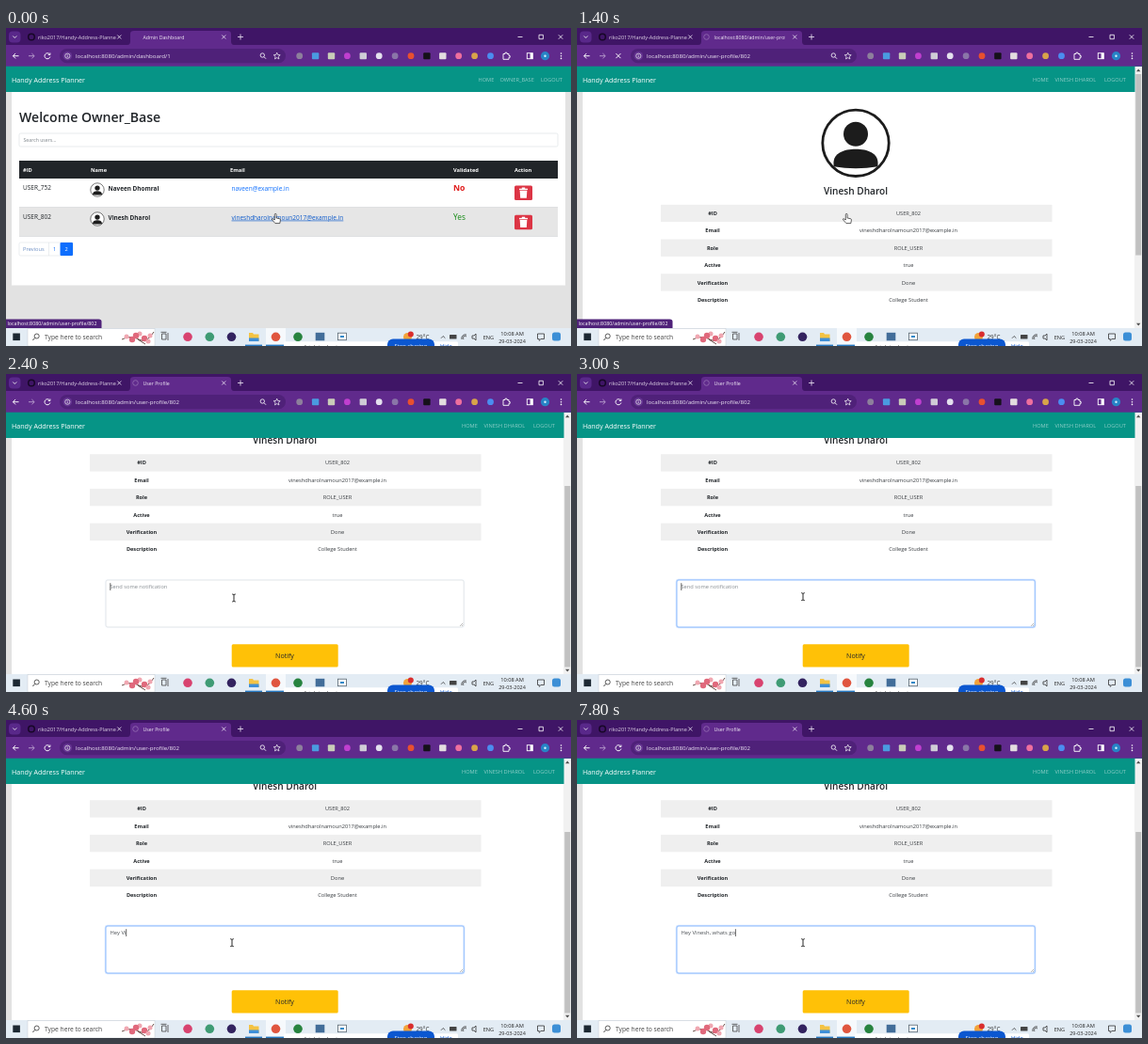
Write an HTML page that moves like this. It is 600 px wide and 338 px high and loops after 8 s.

```html
<!DOCTYPE html>
<html lang="en">
<head>
<meta charset="utf-8">
<title>Admin Dashboard</title>
<style>
html, body { margin: 0; width: 100%; height: 100%; overflow: hidden; background: #e2e2e2; }
svg { display: block; width: 100vw; height: 100vh; font-family: "Open Sans", "Noto Sans", sans-serif; }
text { white-space: pre; }
</style>
</head>
<body>
<svg id="stage" viewBox="0 0 600 338"></svg>
<script>
const STEP = 200, LOOP = 8000, SCROLL_MAX = 102.6;
const INK = '#212529', STRIP = '#3f1566', TOOLBAR = '#602a8c', OMNIBOX = '#4f2179';

const text = (x, y, size, str, fill = INK, extra = '') =>
  `<text x="${x}" y="${y}" font-size="${size}" fill="${fill}" ${extra}>${str}</text>`;
const rect = (x, y, w, h, fill, extra = '') =>
  `<rect x="${x}" y="${y}" width="${w}" height="${h}" fill="${fill}" ${extra}/>`;
const dot = (x, y, r, fill, extra = '') =>
  `<circle cx="${x}" cy="${y}" r="${r}" fill="${fill}" ${extra}/>`;
const line = (d, stroke, w = 1, extra = '') =>
  `<path d="${d}" fill="none" stroke="${stroke}" stroke-width="${w}" ${extra}/>`;
const group = (id, body) => `<g id="${id}">${body}</g>`;
const BOLD = 'font-weight="700"', SEMI = 'font-weight="600"', MID = 'text-anchor="middle"';

const person = (x, y, s) => `<g transform="translate(${x} ${y}) scale(${s})" fill="#1c1c1c">
  ${dot(0, 0, 35.2, '#fff', 'stroke="#1c1c1c" stroke-width="2.8"')}
  <circle cy="-9.5" r="13"/>
  <path d="M-23.5 25V21C-23.5 11-13 6.5 0 6.5S23.5 11 23.5 21V25Q0 29-23.5 25Z"/></g>`;

const trash = y => rect(540, y, 19, 15.5, '#dc3545', 'rx="1.5"') +
  rect(545, y + 3.2, 9, 1.4, '#fff') + rect(547.8, y + 2, 3.4, 1.4, '#fff') +
  `<path d="M545.7 ${y + 5.2}h7.6l-.5 8h-6.6z" fill="#fff"/>`;

const userRow = (y, id, name, mail, hover) =>
  text(18, y + 12.3, 6.5, id) + person(97, y + 12, .205) +
  text(108.5, y + 13.4, 6.4, name, INK, BOLD) +
  text(239.5, y + 12.6, 6.5, mail, hover ? '#0a58ca' : '#0d6efd',
    hover ? 'text-decoration="underline"' : '');

function dashboard() {
  const heads = [[18, '#ID'], [90, 'Name'], [238, 'Email'], [475, 'Validated'], [540, 'Action']];
  return rect(0, 41, 600, 278, '#e2e2e2') + rect(6, 60, 588, 213.5, '#fff') +
    text(14, 99.8, 14.1, 'Welcome Owner_Base', INK, SEMI) +
    rect(14, 112, 572, 14, '#fff', 'stroke="#dee2e6" stroke-width=".7" rx="1.5"') +
    text(18.5, 121, 5.2, 'Search users...', '#7c8389') +
    rect(14, 141, 572, 19, INK) +
    heads.map(([x, s]) => text(x, 152.8, 5.7, s, '#fff', BOLD)).join('') +
    rect(14, 190.5, 572, 31, '#e6e6e6') +
    line('M14 190.5H586M14 221.5H586', '#d3d6d9', .6) +
    userRow(160, 'USER_752', 'Naveen Dhomral', 'naveen@example.in') +
    userRow(191, 'USER_802', 'Vinesh Dharol', 'vineshdharolnamoun2017@example.in', true) +
    text(475, 173.3, 8.7, 'No', '#e01b1b', BOLD) +
    text(475, 204.3, 8.3, 'Yes', '#138a13') +
    trash(167.5) + trash(198.7) +
    rect(14, 228, 57, 14, '#fff', 'stroke="#dee2e6" stroke-width=".6" rx="1.5"') +
    line('M45.5 228V242', '#dee2e6', .6) + rect(57.5, 228, 13.5, 14, '#0d6efd', 'rx="1"') +
    text(18, 237.3, 5.7, 'Previous', '#6d8fc4') + text(50, 237.3, 5.7, '1', '#0d6efd') +
    text(62.5, 237.3, 5.7, '2', '#fff');
}

function profile() {
  const rows = [['#ID', 'USER_802'], ['Email', 'vineshdharolnamoun2017@example.in'],
    ['Role', 'ROLE_USER'], ['Active', 'true'], ['Verification', 'Done'],
    ['Description', 'College Student']];
  const table = rows.map(([key, value], i) => {
    const y = 187.8 + i * 18.35;
    return (i % 2 ? '' : rect(89, y, 415.5, 18.35, '#efefef')) +
      text(144, y + 11.3, 5.6, key, INK, `${BOLD} ${MID}`) +
      text(352, y + 11.3, 5.7, value, '#3a3e42', MID);
  }).join('');
  const page = person(296, 122.3, 1) + text(296, 176.5, 10.1, 'Vinesh Dharol', INK, `${SEMI} ${MID}`) + table +
    rect(104.8, 320.4, 382.6, 52.4, '#cfe2ff', 'id="glow" rx="3"') +
    rect(106, 321.6, 380.2, 50, '#fff', 'id="area" rx="2" stroke-width=".9"') +
    line('M482 370.6l3.2-3.2M484 370.6l1.4-1.4', '#777', .5) +
    text(110.5, 331, 5.85, '', '#555b60', 'id="typed"') +
    line('M0 324.8V332.6', '#222', .7, 'id="caret"') +
    rect(239.7, 389.8, 113, 24.4, '#ffc107', 'rx="1.5"') +
    text(296, 404.9, 7.1, 'Notify', INK, MID);
  return rect(0, 41, 600, 278, '#e2e2e2') + rect(6, 41, 586.5, 278, '#fff') + group('page', page);
}

const scrollbar = () => rect(592.5, 41, 7.5, 278, '#f1f1f1') +
  rect(593.2, 49, 6, 192.5, '#c1c1c1', 'id="thumb"') +
  '<path d="M594 46.3l2.2-2.8 2.2 2.8zM594 313.7l2.2 2.8 2.2-2.8z" fill="#505050"/>';

function navbar() {
  const links = items => items.map(([x, s]) => text(x, 57, 5.65, s, '#fff', 'fill-opacity=".55"')).join('');
  return rect(0, 40, 600, 28, '#069486') + text(6, 57.5, 7.15, 'Handy Address Planner', '#fff') +
    group('navMain', links([[501.5, 'HOME'], [524.5, 'OWNER_BASE'], [568, 'LOGOUT']])) +
    group('navUser', scrollbar() +
      links([[484, 'HOME'], [507.5, 'VINESH DHAROL'], [560, 'LOGOUT']]));
}

function browser() {
  const icons = ['#8d7f9c', '#4a9be0', '#c9ccb8', '#c03fd0', '#cfccd6', '#e4e0ee', '#8a76a8',
    '#e8502f', '#15111a', '#e3dcdf', '#ee6f9e', '#d8a44a', '#4b8df0'];
  const squares = [1, 2, 4, 8, 9];
  return rect(0, 0, 600, 19, STRIP) + rect(0, 18, 600, 22.7, TOOLBAR) +
    `<path d="M129 18Q132 18 132 14V6Q132 3 136 3H235Q239 3 239 6V14Q239 18 242 18Z" fill="${TOOLBAR}"/>` +
    rect(3, 3.5, 12.5, 12, '#59288a', 'rx="4"') + line('M7.3 8.5l2 2 2-2', '#eee', .9) +
    dot(27, 9.5, 3.3, 'none', 'stroke="#170727" stroke-width="1.5"') +
    dot(137.5, 9.5, 2.8, 'none', 'id="tabIcon" stroke="#8c62ad" stroke-width="1"') +
    '<clipPath id="tabClip"><rect x="30" y="3" width="87" height="14"/><rect x="140" y="3" width="81" height="14"/></clipPath>' +
    '<g clip-path="url(#tabClip)">' +
    text(34, 11.6, 5.5, 'riko2017/Handy-Address-Planner', '#e3d9ea') +
    text(145.5, 11.6, 5.2, '', '#f3edf7', 'id="tabTitle"') + '</g>' +
    line('M118.3 7.5l4 4m0-4l-4 4M229.3 7.5l4 4m0-4l-4 4M246 9.5h6m-3-3v6', '#f0eaf5', .8) +
    line('M543.5 9.5h5M566 7.3h4.4v4.4H566zM586.8 7.3l4.4 4.4m0-4.4l-4.4 4.4', '#fff', .8) +
    line('M13.5 29.7H7.5m2.6-2.7l-2.7 2.7 2.7 2.7', '#fff', .95) +
    line('M24 29.7h6m-2.6-2.7l2.7 2.7-2.7 2.7', '#b79bcd', .95) +
    line('M46.2 27.7a3 3 0 1 0 .7 2.8m0-4v2h-2', '#fff', .95, 'id="reload"') +
    line('M41.4 27.1l5 5m0-5l-5 5', '#fff', .95, 'id="stop"') +
    rect(57, 22, 240, 15.3, OMNIBOX, 'rx="7.6"') +
    dot(65.3, 29.7, 4.8, '#653492') +
    dot(65.3, 29.7, 2.6, 'none', 'stroke="#eee" stroke-width=".7"') + line('M65.3 29.3v1.8M65.3 28v.6', '#eee', .7) +
    text(74, 31.8, 6.15, '', '#efe8f5', 'id="url"') +
    dot(272.3, 29, 2.2, 'none', 'stroke="#fff" stroke-width=".8"') + line('M274 30.7l2 2', '#fff', .9) +
    line('M287.7 26.2l1 2.3 2.5.2-1.9 1.7.6 2.5-2.2-1.3-2.2 1.3.6-2.5-1.9-1.7 2.5-.2z', '#fff', .7) +
    icons.map((c, i) => squares.includes(i) ? rect(308 + i * 16.9, 26.2, 7.4, 7, c, 'rx="1"')
      : dot(311.7 + i * 16.9, 29.7, 3.4, c)).join('') +
    line('M528 27.5h2v-1.3h2v1.3h2v2h1.2v1.8H534v2h-6z', '#fff', .9) +
    rect(553.3, 26.7, 6, 6, 'none', 'stroke="#fff" stroke-width=".9"') + rect(556.6, 26.7, 2.7, 6, '#fff') +
    dot(572.5, 29.7, 4.6, '#2784c6') + dot(572.5, 29.7, 1.2, '#d5ecfb') +
    [27, 29.7, 32.4].map(y => dot(589.5, y, .8, '#fff')).join('');
}

function taskbar() {
  const apps = [[193, '#d8436f'], [239.5, '#33235f'], [286.5, '#e0563f'], [310, '#27833f']];
  const petals = [[128, 328], [134, 331], [142, 325], [147, 330], [153, 327], [138, 327], [151, 333]];
  return rect(0, 319, 600, 19, '#e3ecf4') + rect(7.3, 324.5, 7.6, 7.6, '#1c2833') +
    rect(23, 319.7, 135, 18.3, '#fff', 'stroke="#c5ccd2" stroke-width=".5"') +
    dot(32.7, 327.5, 2.5, 'none', 'stroke="#333" stroke-width=".8"') + line('M30.8 329.4l-2.4 2.6', '#333', .9) +
    text(41, 331.2, 6.7, 'Type here to search', '#444') +
    line('M123 331q10-5 18 0t16-8M140 331l8 5', '#5c3a35', .9) +
    petals.map(([x, y], i) => dot(x, y, 2.5 + i % 2 * .7, i % 2 ? '#e0697c' : '#f0a7b1')).join('') +
    line('M165.5 325h4.5v6h-4.5zM172 324v8M164.5 323.3h6', '#444', .8) +
    rect(276, 319, 21, 19, '#f6f9fc') +
    apps.map(([x, c]) => dot(x, 328.3, 4.8, c)).join('') +
    dot(216.3, 328.3, 4.8, '#3f9b74') +
    '<path d="M258 324h4l1 1.4h5.5V333H258z" fill="#f4c343"/>' + rect(258, 329.5, 10.5, 3.5, '#3f8fd8') +
    rect(328.7, 323.8, 9.6, 8.5, '#426d99') +
    rect(352.5, 324.2, 9, 7.5, '#fff', 'stroke="#55636f" stroke-width=".8"') + rect(355, 327, 4, 2, '#3188c8') +
    rect(254, 336.6, 18, 1.4, '#2778c0') + rect(276, 336.6, 21, 1.4, '#2778c0') +
    dot(426.5, 328.5, 4.5, '#f2a33a') + dot(429.8, 325.6, 3, '#d92d2d') +
    text(435.5, 331, 6.3, '29°C', '#333') +
    line('M462 329.7l2.2-2.2 2.2 2.2M484 331a4 4 0 0 1 5-5m-3 5a2 2 0 0 1 3-3M495 327h2l2-2v7l-2-2h-2z', '#333', .8) +
    rect(471, 326, 7.5, 4.5, '#444', 'rx=".6"') +
    text(506.7, 331, 5.6, 'ENG', '#222') +
    text(537.5, 326.8, 5.7, '10:08 AM', '#222', MID) + text(537.5, 335.3, 5.5, '29-03-2024', '#222', MID) +
    line('M564.5 325h7v5.5h-3.5l-1.8 1.8v-1.8h-1.7z', '#333', .8) +
    rect(580, 323.5, 9, 9, '#3c8fd6', 'rx="2.5"') +
    rect(295, 333.2, 185, 6, '#fff', 'rx="1.5"') +
    text(316, 340.6, 6, 'A tab is sharing your screen.', '#333') +
    rect(405, 330.5, 50, 14, '#0b57d0', 'rx="6"') + text(412.5, 340, 5.9, 'Stop sharing', '#fff') +
    text(461, 340, 5.9, 'Hide', '#0b57d0');
}

const pointers =
  `<path id="hand" d="M-1.2-4.6q0-1 .9-1t.9 1V-1l3.4.7q1 .3.9 1.4L4.3 4.6H-.6L-4 .7q-.3-1 .7-1L-1.2 1z"
    fill="#fff" stroke="#222" stroke-width=".7"/>` +
  line('M-1.8-4Q0-4 0-3Q0-4 1.8-4M0-3V3M-1.8 4Q0 4 0 3Q0 4 1.8 4', '#111', .9, 'id="beam"');

const stage = document.getElementById('stage');
stage.innerHTML = group('dash', dashboard()) + group('prof', profile()) + navbar() + browser() +
  group('status', `<path d="M0 309.5H98.5Q101.5 309.5 101.5 312V319H0Z" fill="${OMNIBOX}"/>` +
    text(1.5, 316.4, 5.3, 'localhost:8080/admin/user-profile/802', '#fff')) +
  taskbar() + pointers;

const $ = id => document.getElementById(id);
const show = (id, on) => $(id).setAttribute('display', on ? 'inline' : 'none');
const set = (id, attrs) => Object.entries(attrs).forEach(([k, v]) => $(id).setAttribute(k, v));
const ease = (t, from, to) => {
  const u = Math.min(1, Math.max(0, (t - from) / (to - from)));
  return u * u * (3 - 2 * u);
};

const MESSAGE = 'Hey Vinesh, whats go';
// Time at which each character of the message appears.
const KEYS = [3200, 3400, 3600, 3800, 4200, 4600, 5000, 5200, 5400, 5400,
  5800, 6200, 6400, 6600, 6800, 7000, 7200, 7400, 7400, 7800];

function render(t) {
  const onProfile = t >= 1400, loading = t >= 1400 && t < 1600, focused = t >= 2400;
  const beam = t >= 2200;
  show('dash', !onProfile); show('prof', onProfile);
  show('navMain', !onProfile); show('navUser', onProfile);
  show('status', t < 1800);
  show('reload', !loading); show('stop', loading);
  show('tabIcon', onProfile);
  $('tabTitle').textContent = !onProfile ? 'Admin Dashboard'
    : loading ? 'localhost:8080/admin/user-profile' : 'User Profile';
  $('url').textContent = 'localhost:8080/admin/' + (onProfile ? 'user-profile/802' : 'dashboard/1');

  const scroll = SCROLL_MAX * ease(t, 1600, 2200);
  set('page', { transform: `translate(0 ${-scroll})` });
  set('thumb', { y: 49 + 70 * scroll / SCROLL_MAX });

  const glow = focused ? (t < 2600 ? .1 : 1) : 0;
  set('glow', { opacity: glow });
  set('area', { stroke: glow === 1 ? '#86b7fe' : '#dee2e6' });
  const typed = MESSAGE.slice(0, KEYS.filter(k => k <= t).length);
  $('typed').textContent = typed || 'Send some notification';
  set('typed', { fill: typed ? '#4a4f54' : '#868c91', 'font-size': typed ? 5.85 : 5.7 });
  show('caret', focused);
  const end = typed && onProfile ? $('typed').getComputedTextLength() : 0;
  set('caret', { transform: `translate(${110.8 + end} 0)` });

  const move = ease(t, 1600, 2200), settle = ease(t, 2400, 2600);
  const at = `translate(${286.5 - 44.5 * move - 2 * settle} ${203 + 35 * move - 1.3 * settle})`;
  show('hand', !beam); show('beam', beam);
  set('hand', { transform: at }); set('beam', { transform: at });
}

const start = performance.now();
function frame() {
  const t = (performance.now() - start) % LOOP;
  render(Math.floor(t / STEP) * STEP);
  requestAnimationFrame(frame);
}
frame();
</script>
</body>
</html>
```
